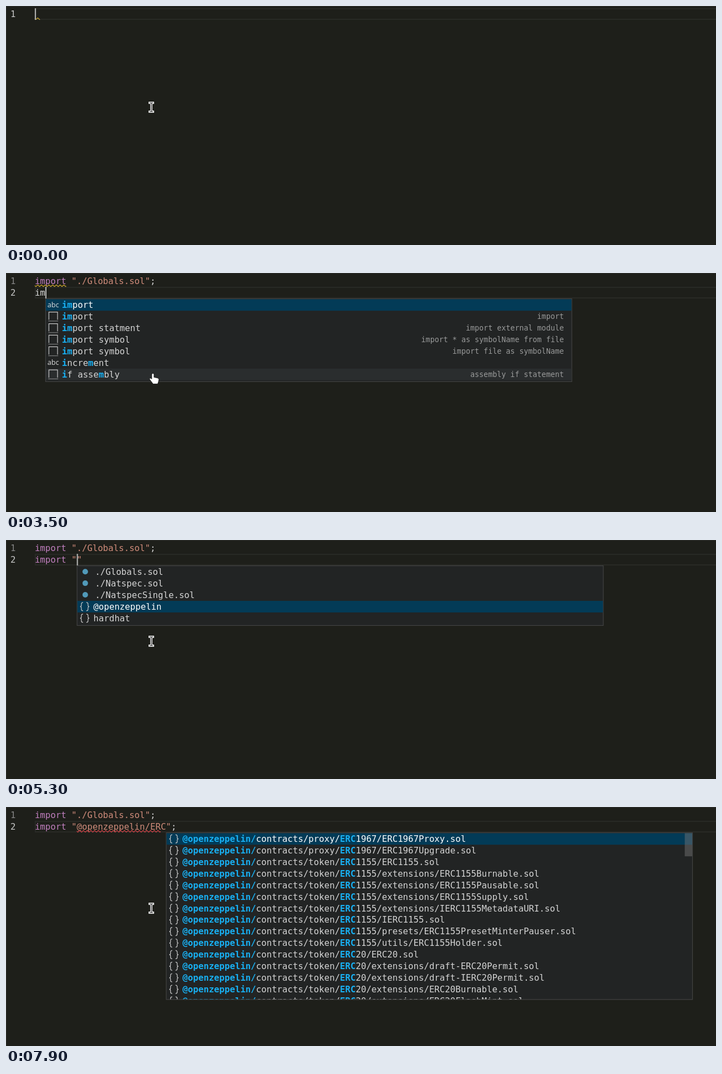
Recreate the animation shown at these times as an HTML page with a canvas. Size 1280 px wide and 432 px high, loop 8000 ms.

```html
<!DOCTYPE html>
<html>
<head>
<meta charset="utf-8">
<title>Import completion</title>
<style>
  html, body { margin: 0; width: 100%; height: 100%; overflow: hidden; background: #1e1f1a; }
  canvas { display: block; }
</style>
</head>
<body>
<canvas id="stage" width="1280" height="432"></canvas>
<script>
const ctx = document.getElementById("stage").getContext("2d");
const LOOP = 8000, SIZE = 15.71, ADVANCE = 0.60205, CELL = SIZE * ADVANCE, ROW = 20.92;
const LEFT = 51.9, TOP = 4.1, MENU_W = 949.8, MAX_MENU_H = 302.5;
const MOUSE = { x: 262, y: 183 };
const YELLOW = "#c9a52c", RED = "#e5484d", TEXT = "#d4d4d4";

const item = (icon, label, detail = "") => ({ icon, label, detail });
const paths = (base, names) =>
  names.map(name => item("braces", "@openzeppelin/contracts/" + base + name + ".sol"));

const imports = [
  item("abc", "import"),
  item("snippet", "import", "import"),
  item("snippet", "import statment", "import external module"),
  item("snippet", "import symbol", "import * as symbolName from file"),
  item("snippet", "import symbol", "import file as symbolName"),
];
const words = [...imports, item("abc", "increment"),
  item("snippet", "if assembly", "assembly if statement")];
const files = [
  ...["Globals", "Natspec", "NatspecSingle"].map(n => item("file", `./${n}.sol`)),
  item("braces", "@openzeppelin"), item("braces", "hardhat"),
];
const contracts = [
  ...paths("access/", ["AccessControl", "AccessControlEnumerable", "IAccessControl",
    "IAccessControlEnumerable", "Ownable"]),
  ...paths("finance/", ["PaymentSplitter", "VestingWallet"]),
  ...paths("governance/compatibility/", ["GovernorCompatibilityBravo", "IGovernorCompatibilityBravo"]),
  ...paths("governance/extensions/", ["GovernorCountingSimple", "GovernorPreventLateQuorum",
    "GovernorProposalThreshold", "GovernorSettings", "GovernorTimelockCompound",
    "GovernorTimelockControl"]),
];
const tokens = [
  ...paths("proxy/ERC1967/", ["ERC1967Proxy", "ERC1967Upgrade"]),
  ...paths("token/ERC1155/", ["ERC1155", "extensions/ERC1155Burnable", "extensions/ERC1155Pausable",
    "extensions/ERC1155Supply", "extensions/IERC1155MetadataURI", "IERC1155",
    "presets/ERC1155PresetMinterPauser", "utils/ERC1155Holder"]),
  ...paths("token/ERC20/", ["ERC20", "extensions/draft-ERC20Permit", "extensions/draft-IERC20Permit",
    "extensions/ERC20Burnable", "extensions/ERC20FlashMint"]),
];

const wave = (line, col, width, color) => ({ line, col, width, color });
const pathWave = chars => wave(1, 8, (chars - 1) * CELL, RED);
const atCaret = col => wave(0, col, 13, YELLOW);
const done = 'import "./Globals.sol";', pkg = 'import "@openzeppelin';

// Each step patches the state; `key` is the moment the caret blink restarts.
const steps = [
  { at: 0, key: -300, line: 0, text: "", col: 0, menu: null, query: "", pick: 0, wave: wave(0, 0, 9.4, YELLOW) },
  { at: 400, key: 400, text: "im", col: 2, wave: atCaret(2) },
  { at: 500, menu: words, query: "im" },
  { at: 700, key: 700, text: "imp", col: 3, menu: imports, query: "imp", wave: atCaret(3) },
  { at: 800, key: 800, text: "impor", col: 5, query: "impor", wave: atCaret(5) },
  { at: 1100, key: 1100, text: "import ", col: 7, menu: null, query: "", wave: atCaret(7) },
  { at: 1200, key: 1200, text: 'import ""', col: 8, wave: atCaret(8) },
  { at: 1300, menu: files },
  { at: 1600, wave: null },
  { at: 2200, key: 2200, text: done, col: 21, menu: null },
  { at: 2500, wave: wave(0, 0, 6 * CELL, YELLOW) },
  { at: 2700, key: 2700, line: 1, text: "", col: 0 },
  { at: 3500, key: 3500, text: "im", col: 2, menu: words, query: "im" },
  { at: 3600, key: 3600, text: "imp", col: 3, menu: imports, query: "imp" },
  { at: 3700, key: 3700, text: "impo", col: 4, query: "impo" },
  { at: 3900, key: 3900, text: "import", col: 6, query: "import" },
  { at: 4000, key: 4000, text: "import ", col: 7, menu: null, query: "" },
  { at: 4100, key: 4200, text: 'import ""', col: 8 },
  { at: 4200, menu: files },
  { at: 4400, wave: null },
  { at: 5000, pick: 1 },
  { at: 5100, pick: 2 },
  { at: 5300, pick: 3 },
  { at: 5500, key: 5600, text: pkg + '"', col: 21, menu: null, pick: 0 },
  { at: 5600, text: pkg + '";' },
  { at: 5900, wave: pathWave(13) },
  { at: 6300, key: 6200, text: pkg + '/";', col: 22, menu: contracts, query: "@openzeppelin/" },
  { at: 6500, wave: pathWave(14) },
  { at: 7200, key: 7200, text: pkg + '/E";', col: 23, menu: tokens, query: "@openzeppelin/E" },
  { at: 7300, key: 7300, text: pkg + '/ER";', col: 24, query: "@openzeppelin/ER" },
  { at: 7500, key: 7400, text: pkg + '/ERC";', col: 25, query: "@openzeppelin/ERC" },
  { at: 7700, wave: pathWave(17) },
];

const lineTop = line => TOP + line * ROW;

function rect(x, y, w, h, color) {
  ctx.fillStyle = color;
  ctx.fillRect(x, y, w, h);
}

// Monospaced text; style(i) gives [color, bold] for each character.
function mono(text, x, top, style, size = SIZE) {
  [...text].forEach((char, i) => {
    const [color, bold] = style(i);
    ctx.font = `${bold ? "bold " : ""}${size}px "DejaVu Sans Mono", monospace`;
    ctx.fillStyle = color;
    ctx.fillText(char, x + i * size * ADVANCE, top + 15.8);
  });
}

function code(text, line) {
  const open = text.indexOf('"'), close = text.lastIndexOf('"');
  mono(text, LEFT, lineTop(line), i => [
    i < 6 && text.length > 6 ? "#c07fbe" : open >= 0 && i >= open && i <= close ? "#ce8b7a" : TEXT,
  ]);
}

function squiggle({ line, col, width, color }) {
  const x = LEFT + col * CELL, y = lineTop(line) + 17.3;
  ctx.beginPath();
  for (let d = 0; d <= width; d += 0.28) {
    const rise = Math.abs((d / 1.12 + 1.25) % 6 - 3);
    ctx.lineTo(x + d, y + 3.1 - rise);
  }
  ctx.strokeStyle = color;
  ctx.lineWidth = 1.2;
  ctx.stroke();
}

function shape(d, x, y, stroke, width, fill) {
  const path = new Path2D(d);
  ctx.save();
  ctx.translate(x, y);
  if (fill) { ctx.fillStyle = fill; ctx.fill(path); }
  ctx.strokeStyle = stroke;
  ctx.lineWidth = width;
  ctx.stroke(path);
  ctx.restore();
}

// Icons are centred on (x, y).
const icons = {
  abc(x, y) {
    ctx.font = '500 12.5px "Open Sans", sans-serif';
    ctx.fillStyle = "#e0e0e0";
    ctx.textAlign = "center";
    ctx.fillText("abc", x, y + 4);
    ctx.textAlign = "left";
  },
  snippet(x, y) {
    shape("M-7.8 6V-8H7.8V6", x, y, "#c8c8c8", 1.2);
    for (let i = 0; i < 8; i++) rect(x - 8.4 + i * 2.24, y + 7.6, 1.2, 1.2, "#c8c8c8");
  },
  braces(x, y) {
    const half = "M-3-7.5Q-6-7.5-6-4.8V-2.4Q-6 0-8.2 0Q-6 0-6 2.4V4.8Q-6 7.5-3 7.5";
    shape(half, x, y, "#c8c8c8", 1.2);
    ctx.save();
    ctx.translate(x, y);
    ctx.scale(-1, 1);
    shape(half, 0, 0, "#c8c8c8", 1.2);
    ctx.restore();
  },
  file(x, y) {
    ctx.beginPath();
    ctx.arc(x + 1, y - 0.5, 5, 0, 7);
    ctx.fillStyle = "#519aba";
    ctx.fill();
  },
};

// Indices of the label characters matched by the typed query.
function matches(label, query) {
  const found = new Set();
  let from = 0;
  for (const char of query) {
    const i = label.indexOf(char, from);
    found.add(i);
    from = i + 1;
  }
  return found;
}

function menuBox({ line, col, menu }) {
  return { x: LEFT + col * CELL, y: lineTop(line + 1) + 0.1,
    h: Math.min(menu.length * ROW + 4.4, MAX_MENU_H) };
}

function drawMenu({ menu, query, pick }, { x, y, h }, hovered) {
  rect(x, y, MENU_W, h, "#454545");
  rect(x + 1.1, y + 1.1, MENU_W - 2.2, h - 2.2, "#222424");
  ctx.save();
  ctx.beginPath();
  ctx.rect(x + 1.1, y + 1.1, MENU_W - 2.2, h - 2.2);
  ctx.clip();
  menu.forEach(({ icon, label, detail }, i) => {
    const top = y + 1.2 + i * ROW;
    const under = hovered && MOUSE.y > top && MOUSE.y < top + ROW;
    if (i === pick || under) rect(x, top, MENU_W, ROW, i === pick ? "#033b57" : "#2a2d2e");
    icons[icon](x + 14.3, top + ROW / 2);
    const hit = matches(label, query), plain = i === pick ? "#ffffff" : TEXT;
    mono(label, x + (icon === "file" ? 33 : 30), top, n => hit.has(n) ? ["#18b0f3", true] : [plain]);
    const small = SIZE * 0.85;
    mono(detail, x + MENU_W - 14.8 - detail.length * small * ADVANCE, top - 0.8, () => ["#999a9a"], small);
  });
  if (h === MAX_MENU_H) {
    rect(x + MENU_W - 14.5, y + 1.1, 13.4, menu === contracts ? 28.5 : 42, "rgba(121,121,121,.45)");
  }
  ctx.restore();
}

function drawMouse(hand) {
  const { x, y } = MOUSE;
  if (hand) {
    shape("M0 0q0-2 2-2t2 2v5l6.2 1.2q2.6.6 2.6 2.8l-.8 4-1.4 4H2.4L-3.6 9q-1.2-2.4 1-2.6L0 8z",
      x + 0.8, y + 0.5, "#151515", 0.8, "#ffffff");
  } else {
    const beam = "M-3-8H3M0-8V8M-3 8H3";
    ctx.lineCap = "square";
    shape(beam, x, y, "#ffffff", 3.8);
    shape(beam, x, y, "#141414", 1.2);
    ctx.lineCap = "butt";
  }
}

function draw(t) {
  const state = Object.assign({}, ...steps.filter(step => step.at <= t));
  const { line, text, col, menu } = state;
  const top = lineTop(line);

  rect(0, 0, 1280, 432, "#1e1f1a");
  rect(0, 0, 1280, 1, "#2d2e2a");
  rect(0, 0, 1, 432, "#2d2e2a");
  ctx.strokeStyle = "#2a2b27";
  ctx.lineWidth = 1.8;
  ctx.strokeRect(LEFT + 0.9, top + 0.9, 1240, ROW - 1.8);

  for (let n = 0; n <= line; n++) {
    mono(String(n + 1), 8, lineTop(n), () => [n === line ? "#c6c6c6" : "#858585"]);
    code(n === line ? text : done, n);
  }
  if (state.wave) squiggle(state.wave);
  if (Math.floor((t - state.key) / 500) % 2 === 0) {
    rect(LEFT + col * CELL, top, 2.2, ROW, "#aeafad");
  }

  let hovered = false;
  if (menu) {
    const box = menuBox(state);
    hovered = MOUSE.x > box.x && MOUSE.x < box.x + MENU_W && MOUSE.y > box.y && MOUSE.y < box.y + box.h;
    drawMenu(state, box, hovered);
  }
  drawMouse(hovered);
}

const start = performance.now();
function tick() {
  draw((performance.now() - start) % LOOP);
  requestAnimationFrame(tick);
}
tick();
</script>
</body>
</html>
```
